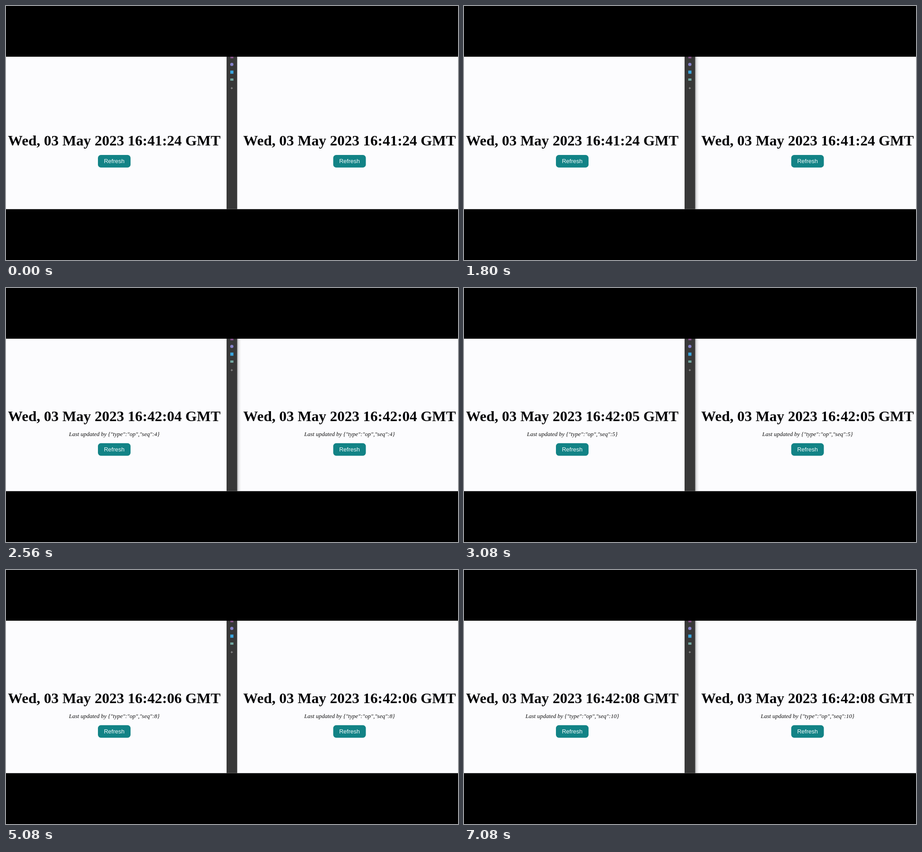
An HTML page for the animation above (7880 ms loop, 998 by 561 pixels).

```html
<!DOCTYPE html>
<html lang="en">
<head>
<meta charset="utf-8">
<title>Shared clock</title>
<style>
  html, body { margin: 0; width: 100%; height: 100%; overflow: hidden; background: #000; }
  svg { display: block; width: 100vw; height: 100vh; }
  text { text-anchor: middle; }
  .time { font: bold 32.5px "Liberation Serif", "Times New Roman", serif; fill: #050507; }
  .note { font: italic 13px "Liberation Serif", "Times New Roman", serif; fill: #111; }
  .label { font: 13px "Liberation Sans", Arial, sans-serif; fill: #f4fdfd; }
</style>
</head>
<body>
<svg viewBox="0 0 998 561">
  <defs>
    <linearGradient id="fade">
      <stop offset="0" stop-color="#777" stop-opacity=".55"/>
      <stop offset=".4" stop-color="#999" stop-opacity=".22"/>
      <stop offset="1" stop-color="#bbb" stop-opacity="0"/>
    </linearGradient>
  </defs>
  <rect width="998" height="561"/>
  <rect y="112" width="998" height="336.7" fill="#fcfcfe"/>
  <rect id="shadow" x="510.5" y="112" width="9" height="336.7" fill="url(#fade)"/>
  <g id="bar">
    <rect x="487" y="112" width="23.5" height="336.7" fill="#383838"/>
    <rect x="495.5" y="112" width="6.5" height="3.5" fill="#8b568f"/>
    <circle cx="498.6" cy="129" r="3.6" fill="#8582c9"/>
    <rect x="495.2" y="142.6" width="7" height="7" fill="#3aa5de"/>
    <rect x="495.2" y="160" width="7" height="5" fill="#72a6a0"/>
    <path d="M496 181.5h5M498.5 179v5" stroke="#a5a5a5" stroke-width=".9"/>
  </g>
  <g id="panes"></g>
</svg>
<script>
  const LOOP = 7880;
  const NS = "http://www.w3.org/2000/svg";
  const panes = document.getElementById("panes");
  const shadow = document.getElementById("shadow");

  function add(parent, tag, attrs) {
    const el = document.createElementNS(NS, tag);
    for (const key in attrs) el.setAttribute(key, attrs[key]);
    return parent.appendChild(el);
  }

  function makePane(cx) {
    const g = add(panes, "g", { transform: `translate(${cx} 0)` });
    const time = add(g, "text", { class: "time" });
    const note = add(g, "text", { class: "note", y: 326.5 });
    const button = add(g, "g", {});
    add(button, "rect", { x: -36, y: 329, width: 72, height: 27.7, rx: 6.5, fill: "#128386" });
    add(button, "text", { class: "label", y: 347.2 }).textContent = "Refresh";
    return { time, note, button };
  }

  const op = n => `{"type":"op","seq":${n}}`;

  // Each step: start in ms, clock, author
  const common = [
    [0, "41:24", ""],
    [1840, "42:04", '{"type":"detached","id":0}'],
    [2560, "42:04", op(4)]
  ];
  const left = [...common,
    [2600, "42:05", op(5)], [3440, "42:05", op(6)],
    [3920, "42:06", op(7)], [4520, "42:06", op(8)],
    [6000, "42:08", op(9)], [7000, "42:08", op(10)]
  ];
  const right = [...common,
    [2640, "42:05", op(5)], [3440, "42:05", op(6)],
    [3840, "42:06", op(7)], [4520, "42:06", op(8)],
    [6040, "42:08", op(9)], [7000, "42:08", op(10)]
  ];
  const views = [[makePane(239), left], [makePane(758.5), right]];

  function drawPane(pane, steps, t) {
    const [, clock, author] = steps.filter(s => s[0] <= t).pop();
    pane.time.textContent = `Wed, 03 May 2023 16:${clock} GMT`;
    pane.time.setAttribute("y", author ? 294 : 308);
    pane.note.textContent = author && `Last updated by ${author}`;
    pane.button.setAttribute("transform", `translate(0 ${author ? 13.8 : 0})`);
  }

  function draw(t) {
    for (const [pane, steps] of views) drawPane(pane, steps, t);
    const leftActive = (t >= 1760 && t < 3480) || t >= 5960;
    shadow.setAttribute("opacity", leftActive ? 1 : 0);
  }

  let start;
  function tick(now) {
    start ??= now;
    draw((now - start) % LOOP);
    requestAnimationFrame(tick);
  }
  draw(0);
  requestAnimationFrame(tick);
</script>
</body>
</html>
```
